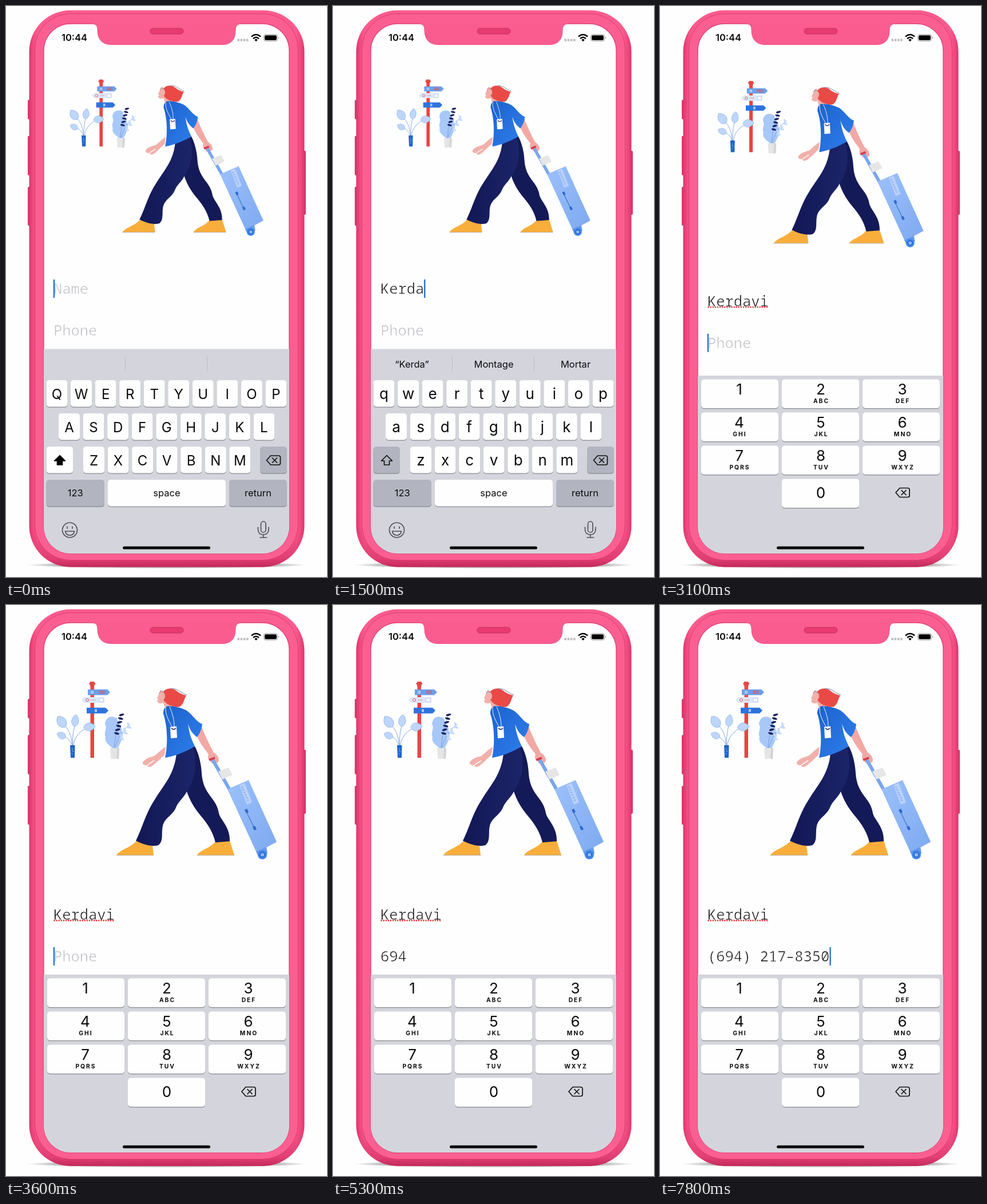
Recreate the animation shown at these times as an HTML page. Size 561 by 998 pixels, loop 7.9 s.

```html
<!DOCTYPE html>
<html lang="en">
<head>
<meta charset="utf-8">
<title>Sign-up form</title>
<style>
html, body { margin: 0; width: 100%; height: 100%; overflow: hidden; background: #fefefe; }
svg { display: block; width: 100%; height: 100%; }
text { font-family: Inter, Roboto, "Liberation Sans", sans-serif; fill: #0b0b0d; }
.mid { text-anchor: middle; }
/* the pale outline thins the strokes to a light weight */
.field { font: 300 25.4px "Noto Sans Mono", "DejaVu Sans Mono", monospace; stroke: #fefefe; stroke-width: .7px; }
.letter { font-size: 24px; }
.lower .letter { font-size: 26px; }
.label { font-size: 16.5px; }
.digit { font-size: 26px; }
.sub { font-size: 10.3px; font-weight: 700; letter-spacing: 2px; }
.line { fill: none; stroke: #111; stroke-width: 1.7; stroke-linejoin: round; stroke-linecap: round; }
</style>
</head>
<body>
<svg viewBox="0 0 561 998" preserveAspectRatio="none">
  <defs>
    <clipPath id="screen"><rect x="66" y="31" width="429" height="926" rx="47"/></clipPath>
    <linearGradient id="shell" x1="0" x2="1" y1="0" y2="0">
      <stop offset="0" stop-color="#d9376c"/><stop offset=".012" stop-color="#ef477f"/>
      <stop offset=".03" stop-color="#fa5b8e"/><stop offset=".97" stop-color="#fa5b8e"/>
      <stop offset=".988" stop-color="#ef477f"/><stop offset="1" stop-color="#d9376c"/>
    </linearGradient>
    <linearGradient id="under" x1="0" x2="0" y1="0" y2="1">
      <stop offset=".93" stop-color="#d22f63" stop-opacity="0"/>
      <stop offset=".985" stop-color="#d9346a" stop-opacity=".75"/>
      <stop offset="1" stop-color="#c0295a"/>
    </linearGradient>
    <linearGradient id="shirt" x1="0" y1="0" x2="1" y2="1">
      <stop offset="0" stop-color="#1c62cc"/><stop offset="1" stop-color="#2f80ee"/>
    </linearGradient>
    <linearGradient id="legs" x1="0" y1="0" x2="1" y2="0">
      <stop offset="0" stop-color="#121755"/><stop offset="1" stop-color="#1c2569"/>
    </linearGradient>
    <linearGradient id="bag" x1="0" y1="0" x2="1" y2="1">
      <stop offset="0" stop-color="#9cc0fa"/><stop offset="1" stop-color="#7eaaf1"/>
    </linearGradient>
    <radialGradient id="floor">
      <stop offset=".8" stop-color="#777"/><stop offset="1" stop-color="#777" stop-opacity="0"/>
    </radialGradient>
    <path id="leaf" d="M0 12C-11 8-11-5 0-12C11-5 11 8 0 12Z" fill="#bdd6fa" stroke="#7fa6e2" stroke-width=".7"/>
    <g id="erase">
      <path class="line" d="M-12 0L-5-8H9Q12-8 12-5V5Q12 8 9 8H-5Z"/>
      <path class="line" d="M-2-4L6 4M6-4L-2 4"/>
    </g>
  </defs>

  <!-- phone body -->
  <ellipse cx="281" cy="977" rx="245" ry="6" fill="url(#floor)" opacity=".5"/>
  <g fill="#d8386c">
    <rect x="38" y="164" width="6" height="34" rx="2"/>
    <rect x="38" y="227" width="6" height="69" rx="2"/>
    <rect x="38" y="316" width="6" height="68" rx="2"/>
    <rect x="518" y="253" width="6" height="112" rx="2"/>
  </g>
  <rect x="40.500" y="7.500" width="481" height="973" rx="72" fill="url(#shell)"/>
  <rect x="40.500" y="7.500" width="481" height="973" rx="72" fill="url(#under)"/>
  <rect x="50.500" y="13.500" width="460" height="955" rx="62" fill="#fb5f92" stroke="#dc3c70"/>
  <rect x="66" y="31" width="429" height="926" rx="47" fill="#fefefe" stroke="#e2427a" stroke-width="1.400"/>

  <g clip-path="url(#screen)">
    <g id="scene">
      <!-- signpost -->
      <path d="M147.500 140H154V267H147.500Z M145.500 136H156V139H145.500Z M147 134H154.500V142H147Z" fill="#e64643"/>
      <path d="M143 147.500H177L182 152.500L177 157.500H143Z" fill="#6c9fea"/>
      <path d="M172 161H137L132 166L137 171H172Z" fill="#dce7fa"/>
      <path d="M141 179.500H174L179 184.500L174 189.500H141Z" fill="#2d73dd"/>
      <path d="M162 150.500H173M162 152.500H173M162 154.500H173" stroke="#d9555f"/>
      <path d="M148 150H153V155H148Z M155 182H159V187H155Z" fill="#a9c8f8"/>
      <circle cx="142" cy="166" r="2.500" fill="none" stroke="#e05a5f"/>
      <path d="M148 166H157" stroke="#e89095"/>
      <rect x="163" y="163" width="7" height="6" fill="#fff" stroke="#a9b7d8" stroke-width=".600"/>
      <!-- plants -->
      <path d="M116 246C115 228 108 214 99 207M116 246C116 230 118 218 121 208M116 246C112 236 106 231 98 228M117 246C120 230 130 218 146 213" fill="none" stroke="#7fa6e2"/>
      <use href="#leaf" transform="translate(97 204) rotate(-35) scale(.95)"/>
      <use href="#leaf" transform="translate(121 202) rotate(8) scale(.75 .9)"/>
      <use href="#leaf" transform="translate(97 228) rotate(-65) scale(.7)"/>
      <use href="#leaf" transform="translate(146 213) rotate(85) scale(.85)"/>
      <path d="M112 245H120.500L120 267H113Z" fill="#1f64cc"/>
      <path d="M116 250V256H119M114 260H117" fill="none" stroke="#7fb0f5" stroke-width=".800"/>
      <path d="M188 252C180 244 171 240 174 230C170 222 178 217 173 208C174 196 184 192 194 198C196 207 203 212 202 220C207 228 202 238 194 252Z" fill="#a8c8f8"/>
      <path d="M189 250C190 230 196 208 202 191M190 250C196 230 206 216 217 208" fill="none" stroke="#6f96d8" stroke-width=".800"/>
      <g id="twigs"></g>
      <path d="M182 250H198L197 269H183.500Z" fill="#e5e5e6"/>
      <path d="M194 250H198L197 269H193Z" fill="#d4d4d6"/>
      <!-- legs and shoes -->
      <path d="M193 437C200 427 219 424 228 412C237 416 247 421 256 420L258 437Z M334 437C341 427 358 425 366 413L391 412L399 437Z" fill="#f9ae3b"/>
      <path d="M193 437.300H258M334 437.300H399" stroke="#b9a58c"/>
      <path d="M301 259L330 247C337 260 341 277 342 294C343 312 349 323 357 334C365 344 370 352 372 364C375 376 392 388 391 413L366 415C362 397 352 382 340 368C329 355 321 341 316 326Z" fill="#141a57"/>
      <path d="M298 258L326 247C336 278 331 304 316 326C310 338 302 342 297 354C292 367 277 372 274 386C271 398 276 413 266 420C252 423 239 418 227 412C239 388 244 364 260 340C275 315 295 296 298 258Z" fill="url(#legs)"/>
      <!-- arms, head -->
      <path d="M279 248L277 262C270 268 264 275 256 281C250 285 245 283 249 279C245 281 238 280 239 275C242 269 251 266 259 264C265 260 269 254 279 248Z" fill="#f2b0ab"/>
      <path d="M248 279L259 272" stroke="#fefefe" stroke-width="1.500"/>
      <path d="M270 149L264 163L266 165L264 168C265 172 270 173 275 171L278 181L288 180L289 153Z" fill="#f2b0ab"/>
      <path d="M275 152C279 145 291 144 298 150C304 155 310 157 315 158C311 164 311 174 303 178C293 179 281 175 275 166C279 162 279 157 275 152Z" fill="#e94a46"/>
      <path d="M288 146C300 145 306 154 316 157M268 155C269 149 274 150 275 154" fill="none" stroke="#7382a8"/>
      <path d="M333 227L342 213C349 230 356 245 363 258C370 262 374 270 371 274C366 279 359 279 357 272C353 270 352 266 354 261C347 252 338 240 333 227Z" fill="#f2a9a5"/>
      <path d="M281 177C276 180 275 184 275 190C281 208 284 238 278 267C296 264 315 256 330 247C324 235 320 224 318 207C321 219 327 226 334 231C339 224 342 217 343 208C333 205 326 191 315 184C305 179 292 176 281 177Z" fill="url(#shirt)"/>
      <path d="M279 178C278 194 286 204 290 213M286 178C291 190 294 200 294 213" fill="none" stroke="#eef4ff"/>
      <path d="M287 213L298 212L299 232L288 233Z" fill="#fff"/>
      <path d="M289 215Q293 220 297 215" fill="none" stroke="#17205e" stroke-width="1.400"/>
      <!-- suitcase -->
      <path d="M361 270L391 323" stroke="#78a6ec" stroke-width="6"/>
      <path d="M355 271L365 267" stroke="#d43e4c" stroke-width="4"/>
      <path d="M387 322L424 306L473 414L438 433Z" fill="url(#bag)"/>
      <path d="M408 315L417 311L430 345L421 349Z" fill="#b9d1fa"/>
      <path d="M412 317L424 344" stroke="#92b5ee" stroke-dasharray="3 2" stroke-width="3"/>
      <path d="M420 361L434 390" stroke="#4d7fd4" stroke-width="1.600"/>
      <path d="M417 358L421 356L424 362L420 364Z M431 388L435 386L438 392L434 394Z" fill="#2a69d2"/>
      <path d="M371 291L389 284L396 297L378 305Z" fill="#e6e6e7"/>
      <path d="M437 431L455 423L457 434L442 442Z" fill="#6799e8"/>
      <circle cx="448" cy="436.500" r="8" fill="#4188ee"/>
      <circle cx="448" cy="436.500" r="4" fill="#8bb7fa" stroke="#1f5fc6" stroke-width="1.600"/>
    </g>

    <g id="form">
      <text id="name" class="field" x="83" y="503"></text>
      <text id="phone" class="field" x="83" y="576"></text>
      <path id="typo" d="M84.500 504.500H189" stroke="#e2423f" stroke-width="2.800" stroke-linecap="round" stroke-dasharray="0 4.100"/>
      <rect id="caret" width="2.400" height="32" fill="#2a70d8"/>
    </g>
    <g id="letters"></g>
    <g id="numbers"></g>
    <rect x="204" y="944.500" width="153" height="5" rx="2.500" fill="#050505"/>
  </g>

  <!-- notch and status bar -->
  <path d="M148 30C157 31 160 34 160 42C160 58 168 67.500 184 67.500H378C394 67.500 401 58 401 42C401 34 405 31 413 30Z" fill="#fa5c8f"/>
  <path d="M148 31C157 31 160 34 160 42C160 58 168 67.500 184 67.500H378C394 67.500 401 58 401 42C401 34 405 31 413 31" fill="none" stroke="#ee5287"/>
  <rect x="252" y="39" width="58" height="10" rx="5" fill="#e83a71" stroke="#c52e60"/>
  <text x="97" y="61.300" font-size="16.500" font-weight="600">10:44</text>
  <path d="M404.500 59.500H424" stroke="#bbbbc0" stroke-width="4" stroke-dasharray="3.500 1.700"/>
  <g fill="none" stroke="#050505" stroke-width="2.400">
    <path d="M429 53.500Q437 46.500 445 53.500M432 57Q437 52.500 442 57"/>
  </g>
  <path d="M434.300 59.200Q437 56.500 439.700 59.200L437 62Z"/>
  <rect x="450.500" y="49.800" width="24" height="11.500" rx="3.500" fill="none" stroke="#999"/>
  <rect x="452" y="51.300" width="21" height="8.500" rx="2.300"/>
  <path d="M476 53.500Q478.500 55.500 476 57.500Z" fill="#999"/>
</svg>

<script>
const LOOP = 7900, STEP = 100, ADVANCE = 15.26;
const NAME = "Kerdavi", DIGITS = "6942178350";
const NAME_TIMES = [400, 700, 900, 1200, 1400, 1700, 2000];
const DIGIT_TIMES = [4500, 4700, 4900, 5500, 5700, 6000, 6200, 6400, 6700, 7000];
const SWITCH = 2800, SLIDE = 2900, SLIDE_MS = 420;
const BOARD = "#d4d5dc", DARK = "#b2b5c0", PRESSED = "#b8bfcf";

const $ = id => document.getElementById(id);

function add(parent, tag, attrs, text) {
  const el = document.createElementNS("http://www.w3.org/2000/svg", tag);
  for (const k in attrs) el.setAttribute(k, attrs[k]);
  if (text) el.textContent = text;
  parent.append(el);
  return el;
}

function key(parent, x, y, width, height, fill = "#fefefe") {
  add(parent, "rect", { x, y: y + 1.3, width, height, rx: 5, fill: "#898b92" });
  return add(parent, "rect", { x, y, width, height, rx: 5, fill });
}

const label = (parent, x, y, cls, text) =>
  add(parent, "text", { x, y, class: "mid " + cls }, text);

function buildTwigs(g) {
  for (let i = 0; i < 6; i++) {
    const side = i % 2 ? 1 : -1;
    add(g, "ellipse", { rx: 4.5, ry: 1.8, fill: "#18205d",
      transform: `translate(${202 - i * 1.7} ${192 + i * 6.5}) rotate(${side * 15})` });
    add(g, "ellipse", { rx: 4.5, ry: 1.8, fill: "#c4daf9",
      transform: `translate(${216 - i * 3.2 + side * 2} ${209 + i * 5}) rotate(${side > 0 ? 15 : 70})` });
  }
}

function buildLetters(g) {
  add(g, "rect", { x: 66, y: 599.5, width: 429, height: 360, fill: BOARD });
  add(g, "path", { d: "M208.5 613V638M351.5 613V638", stroke: "#bcbec7" });
  const hints = [138, 281, 424].map(x => label(g, x, 632, "label", ""));
  const caps = [];
  [["qwertyuiop", 70.5], ["asdfghjkl", 92], ["zxcvbnm", 135]].forEach(([row, x0], r) =>
    [...row].forEach((c, i) => {
      const x = x0 + i * 42.55, y = 654 + r * 58;
      key(g, x, y, 37, 46.5);
      caps.push([label(g, x + 18.5, y + 32.5, "letter", c), c]);
    }));
  const shift = key(g, 70.5, 770, 46.5, 46.5);
  const arrow = add(g, "path", { class: "line",
    d: "M94 785.5L103.5 795H98.5V802H89.5V795H84.5Z" });
  key(g, 444, 770, 47, 46.5, DARK);
  add(g, "use", { href: "#erase", transform: "translate(467.5 794)" });
  [[70.5, 101.5, DARK, "123"], [178, 206, "#fefefe", "space"], [390, 101, DARK, "return"]]
    .forEach(([x, w, fill, s]) => {
      key(g, x, 828, w, 46.5, fill);
      label(g, x + w / 2, 857, "label", s);
    });
  const icon = { class: "line", style: "stroke:#505258" };
  add(g, "circle", { cx: 111.5, cy: 916, r: 13, ...icon });
  add(g, "path", { d: "M103.5 918H119.5Q118 925 111.5 925T103.5 918Z", ...icon });
  add(g, "path", { d: "M107 910V913M116 910V913", ...icon });
  add(g, "rect", { x: 445.5, y: 901, width: 8.5, height: 19, rx: 4.2, ...icon });
  add(g, "path", { d: "M440.5 911V915Q441 924 449.7 924T459 915V911M449.7 924V929M444 929H455.5", ...icon });
  return { hints, caps, shift, arrow };
}

function buildNumbers(g) {
  add(g, "rect", { x: 66, y: 646, width: 429, height: 314, fill: BOARD });
  const subs = ["", "ABC", "DEF", "GHI", "JKL", "MNO", "PQRS", "TUV", "WXYZ"];
  const pads = {};
  for (let i = 0; i < 10; i++) {
    const zero = i === 9, col = zero ? 1 : i % 3;
    const y = 652.5 + Math.floor(i / 3) * 58;
    const mid = 138.5 + col * 142.5;
    const digit = zero ? 0 : i + 1;
    pads[digit] = key(g, 72 + col * 141, y, 135, 50.5);
    label(g, mid, y + (zero ? 33.5 : 26.5), "digit", digit + "");
    if (subs[i]) label(g, mid + 1, y + 41.7, "sub", subs[i]);
  }
  add(g, "use", { href: "#erase", transform: "translate(424 850.5)" });
  return pads;
}

function formatPhone(d) {
  if (d.length < 4) return d;
  const a = d.slice(0, 3);
  return d.length < 8 ? `${a}–${d.slice(3)}` : `(${a}) ${d.slice(3, 6)}–${d.slice(6)}`;
}

function setField(el, value, placeholder) {
  el.textContent = value || placeholder;
  el.style.fill = value ? "#0c0c0e" : "#bdbdc3";
}

const passed = (times, t) => times.filter(x => x <= t).length;
const show = (el, on) => { el.style.display = on ? "" : "none"; };

buildTwigs($("twigs"));
const board = buildLetters($("letters"));
const pads = buildNumbers($("numbers"));

function draw(t) {
  const typed = NAME.slice(0, passed(NAME_TIMES, t));
  const phone = formatPhone(DIGITS.slice(0, passed(DIGIT_TIMES, t)));
  const onPhone = t >= SWITCH;

  const u = Math.min(1, Math.max(0, (t - SLIDE) / SLIDE_MS));
  const p = u * u * (3 - 2 * u);
  $("form").setAttribute("transform", `translate(0 ${47 * p})`);
  $("scene").setAttribute("transform",
    `translate(279.7 ${129 + 5.5 * p}) scale(${0.88 + 0.12 * p}) translate(-279.7 -134.5)`);

  setField($("name"), typed, "Name");
  setField($("phone"), phone, "Phone");
  show($("typo"), onPhone);

  // the caret stays solid after each input, then blinks
  const last = Math.max(...[0, SWITCH, ...NAME_TIMES, ...DIGIT_TIMES].filter(x => x <= t));
  show($("caret"), (t - last) % 800 < 400);
  $("caret").setAttribute("x", 82.7 + (onPhone ? phone : typed).length * ADVANCE);
  $("caret").setAttribute("y", onPhone ? 551 : 478);

  show($("letters"), !onPhone);
  show($("numbers"), onPhone);
  const upper = !typed;
  $("letters").setAttribute("class", upper ? "" : "lower");
  board.caps.forEach(([el, c]) => { el.textContent = upper ? c.toUpperCase() : c; });
  board.shift.setAttribute("fill", upper ? "#fefefe" : DARK);
  board.arrow.style.fill = upper ? "#050505" : "none";
  const words = [typed && `“${typed}”`, typed && "Montage", typed && "Mortar"];
  board.hints.forEach((el, i) => { el.textContent = words[i]; });

  const hit = DIGIT_TIMES.findIndex(x => t >= x - 100 && t < x);
  for (const d in pads) pads[d].setAttribute("fill", d === DIGITS[hit] ? PRESSED : "#fefefe");
}

function tick() {
  const t = performance.now() % LOOP;
  draw(Math.floor(t / STEP) * STEP);
  requestAnimationFrame(tick);
}
tick();
</script>
</body>
</html>
```
